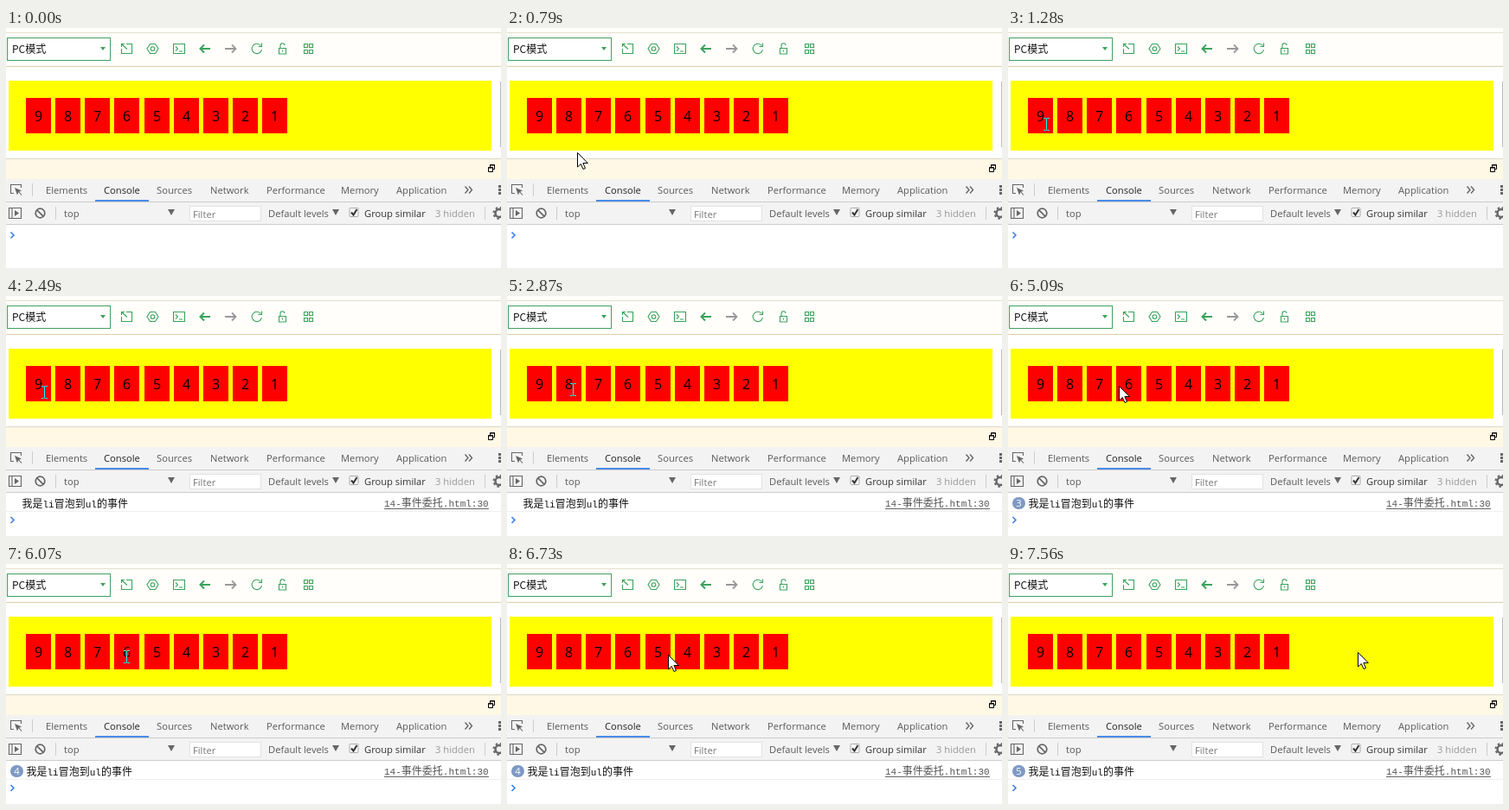
Animation of 572x278 px, one loop 8000 ms. Source, as an HTML page:

```html
<!DOCTYPE html>
<html lang="zh">
<meta charset="utf-8">
<title>Event delegation</title>
<style>
  html, body { margin: 0; width: 572px; height: 278px; overflow: hidden; background: #fff }
  svg { display: block; isolation: isolate }
  text { font: 11.2px "Open Sans", sans-serif; fill: #5a5a5a }
  .cjk { font: 12px "Noto Sans CJK SC", "Noto Sans CJK", sans-serif; fill: #111 }
  .mono { font: 11px "Liberation Mono", monospace }
  .num { font-size: 16px; text-anchor: middle; fill: #000 }
  .green, .gray { fill: none; stroke: #3aa35c; stroke-width: 1.1 }
  .gray { stroke: #666 }
  #beam { mix-blend-mode: difference }
</style>
<svg width="572" height="278">
  <rect width="572" height="278" fill="#fff"/>
  <rect width="572" height="45" fill="#fffefb"/>
  <path d="M0 5.5H572" stroke="#e4dfcc"/>
  <path d="M0 44.5H572" stroke="#dccfa8"/>

  <!-- page toolbar -->
  <rect x="1.5" y="11.5" width="119" height="26" fill="#fff" stroke="#3f9f60"/>
  <text class="cjk" x="7" y="28.5">PC模式</text>
  <path d="M109 22h6l-3 4z" fill="#3aa35c"/>
  <g class="green">
    <path d="M139 18.500H145.500V29.500H133.500V24M133.500 22V18.500H137M133.500 18.500L140 24.500"/>
    <path d="M166.500 18.500h6l3.500 5.500-3.500 5.500h-6l-3.500-5.500z"/><circle cx="169.500" cy="24" r="2.300"/>
    <path d="M193.500 18.500h13v11h-13zM196 21.500l2.500 2.500-2.500 2.500M200 27h4"/>
    <path d="M236 24H225M229 19.500L224.500 24l4.500 4.500" stroke-width="2"/>
    <path d="M253 24H265M261 19.500L265.500 24l-4.500 4.500" stroke="#999" stroke-width="1.800"/>
    <path d="M294.500 20.500A5.700 5.700 0 1 0 295.500 25M295.500 17.500V21.500H291.500"/>
    <path d="M315.500 23.500h8v6.500h-8zM317 23.500V20.500a2.500 2.500 0 0 1 5-.5M319.500 25.500v2"/>
    <path d="M344.500 18.500h4v4h-4zM350.500 18.500h4v4h-4zM344.500 25.500h4v4h-4zM350.500 25.500h4v4h-4z"/>
  </g>

  <!-- page -->
  <rect x="3" y="61" width="558" height="81" fill="#ff0"/>
  <path d="M571.500 62V138" stroke="#bbb"/>
  <g id="cells"></g>

  <!-- panel header -->
  <rect y="151" width="572" height="24" fill="#fff8e5"/>
  <path d="M0 151.500H572" stroke="#ddd6c4"/>
  <path d="M559.500 161V158.500h5v5H562M557.500 161.500h5v5h-5zM557 162h6M559 159h6" fill="none" stroke="#000"/>

  <!-- tabs and filter bar -->
  <rect y="175" width="572" height="53" fill="#f3f3f3"/>
  <path d="M0 201.500H572M0 227.500H572" stroke="#ccc"/>
  <rect x="103" y="199" width="62" height="2" fill="#4a8bea"/>
  <g id="labels"></g>
  <g class="gray">
    <path d="M9 191.500H5.500V181.500H17.500V185"/>
    <path d="M10 185l8 3.500-3.500 1.500-1.500 3.500z" fill="#666" stroke="none"/><path d="M14 189l4 4.500"/>
    <path d="M530.500 183.500l3.500 4-3.500 4M535 183.500l3.500 4-3.500 4" stroke-width="1.400"/>
    <path d="M3.500 208.500h14v12h-14zM7 208.500v12"/><path d="M10 211l5 3.500-5 3.500z" fill="#666" stroke="none"/>
    <circle cx="39.500" cy="214.500" r="5.300" stroke-width="1.700"/><path d="M35.800 210.800l7.500 7.500" stroke-width="1.700"/>
    <circle cx="570" cy="214.500" r="4.500" stroke-width="2.500"/>
    <circle cx="570" cy="214.500" r="6.500" stroke-width="2" stroke-dasharray="2.500 2.600"/>
    <path d="M30.500 180v15M57.500 207v15M553.500 207v15" stroke="#ccc" stroke-width="1"/>
  </g>
  <path d="M569 182h3v3h-3zM569 186h3v3h-3zM569 190h3v3h-3zM187 210h8l-4 7zM377 210h8l-4 7z" fill="#666"/>
  <rect x="212.500" y="206.500" width="82" height="17" fill="#fff" stroke="#e2e2e2"/>
  <text x="216" y="220" style="fill:#777">Filter</text>
  <rect x="397" y="208.500" width="10" height="10" rx="1" fill="#f8f8f8" stroke="#aaa"/>
  <path d="M399 213.500l2.500 3 4-6.500" fill="none" stroke="#333" stroke-width="2"/>

  <!-- console -->
  <g id="log">
    <path d="M0 249.500H572" stroke="#f0f0f0"/>
    <text id="message" class="cjk" y="244.500">我是<tspan class="mono">li</tspan>冒泡到<tspan class="mono">ul</tspan>的事件</text>
    <text class="cjk" x="437" y="244" style="fill:#555"><tspan class="mono">14-</tspan>事件委托<tspan class="mono">.html:30</tspan></text>
    <path d="M437 246.500H558" stroke="#666"/>
    <g id="badge">
      <rect x="5" y="233" width="15" height="14" rx="7" fill="#7e99c4"/>
      <text id="count" x="12.500" y="244" text-anchor="middle" style="fill:#fff"></text>
    </g>
  </g>
  <path id="prompt" d="M5.500 -3.500l3.500 3.500-3.500 3.500" fill="none" stroke="#3d80e8" stroke-width="1.600"/>

  <path id="arrow" d="M0 0V16.500L3.800 13 6.500 19 9 18 6.400 12H11.800Z" fill="#fff" stroke="#000"/>
  <path id="beam" d="M-3.500 -7H-1L0 -6 1 -7H3.500M0 -7V7M-3.500 7H-1L0 6 1 7H3.500" fill="none" stroke="#fff"/>
</svg>
<script>
const $ = id => document.getElementById(id);
const LOOP = 8000, PITCH = 34.15, CELL = 29, LEFT = 23;
const clicks = [1910, 3520, 4760, 6070, 7050];

// time, x, y of the pointer
const path = [
  [280, 470, 278], [790, 81, 144], [1070, 50, 116], [1120, 50, 116], [1280, 44, 111],
  [2490, 44, 111], [2870, 76, 108], [3990, 76, 108], [4150, 91, 103], [4480, 109, 106],
  [4760, 109, 106], [5090, 128, 104], [5350, 139, 107], [6070, 139, 107], [6310, 186, 105],
  [6730, 186, 105], [6770, 184, 105], [7270, 184, 105], [7560, 404, 102], [LOOP, 404, 102]
];

for (let i = 0; i < 9; i++) {
  const x = Math.round(LEFT + i * PITCH);
  $('cells').innerHTML += `<rect x="${x}" y="81" width="${CELL}" height="41" fill="red"/>
    <text class="num" x="${x + CELL / 2}" y="108">${9 - i}</text>`;
}

const labels = [
  ['Elements', 46, 192], ['Console', 113, 192, '#222'], ['Sources', 174, 192],
  ['Network', 236, 192], ['Performance', 301, 192], ['Memory', 387, 192],
  ['Application', 451, 192], ['top', 67, 219], ['Default levels', 303, 219],
  ['Group similar', 414, 219, '#333'], ['3 hidden', 496, 219, '#999']
];
for (const [label, x, y, color = '#5a5a5a'] of labels)
  $('labels').innerHTML += `<text x="${x}" y="${y}" style="fill:${color}">${label}</text>`;

function pointer(t) {
  const next = path.findIndex(key => key[0] > t);
  const [t0, x0, y0] = path[next - 1], [t1, x1, y1] = path[next];
  const k = (t - t0) / (t1 - t0);
  return [x0 + (x1 - x0) * k, y0 + (y1 - y0) * k];
}

// digits and the gaps between the cells count as text
function overText(x, y) {
  if (y < 91 || y > 114 || x < LEFT || x > 325) return false;
  const offset = (x - LEFT) % PITCH;
  return Math.abs(offset - CELL / 2) < 7 || offset > CELL || offset < 1;
}

function show(id, visible) {
  $(id).style.display = visible ? '' : 'none';
}

function draw(now) {
  const t = now % LOOP;
  const count = clicks.filter(c => c <= t).length;
  show('log', count > 0);
  show('badge', count > 1);
  $('count').textContent = count;
  $('message').setAttribute('x', count > 1 ? 23.5 : 18.5);
  $('prompt').setAttribute('transform', `translate(0 ${count ? 259.5 : 240})`);

  const moving = t >= path[0][0];
  const [x, y] = moving ? pointer(t) : [0, 0];
  const text = overText(x, y);
  show('arrow', moving && !text);
  show('beam', moving && text);
  const place = `translate(${Math.round(x) + .5} ${Math.round(y) + .5})`;
  $('arrow').setAttribute('transform', place);
  $('beam').setAttribute('transform', place);
}

function tick() {
  draw(performance.now());
  requestAnimationFrame(tick);
}
tick();
</script>
</html>
```
